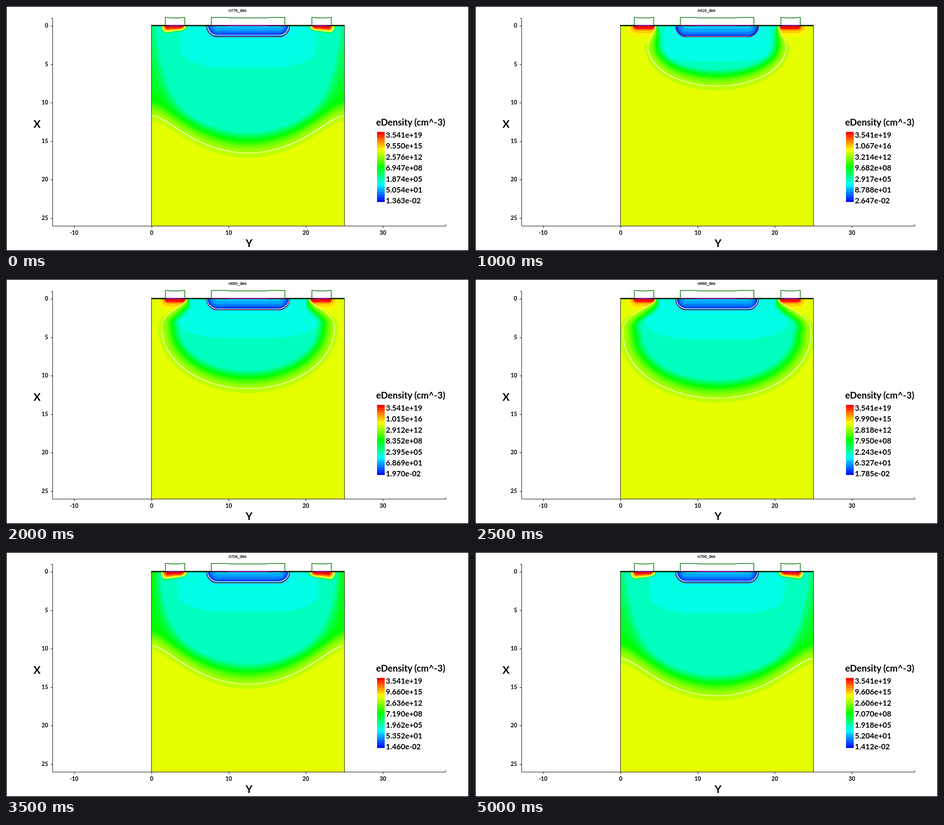
These frames come from a looping animation (1027 by 545 pixels, 5.5 s). An HTML page with a canvas:

```html
<!DOCTYPE html>
<html lang="en">
<head>
<meta charset="utf-8">
<title>eDensity</title>
<style>
  html, body { margin: 0; width: 100%; height: 100%; overflow: hidden; background: #fff; }
  canvas { position: absolute; left: 323px; top: 44px; }
  svg { position: absolute; left: 0; top: 0; }
  text { font-family: Lato, "Open Sans", sans-serif; font-weight: 700; }
  #title { font: 9px "Liberation Sans", Arial, sans-serif; stroke: #000; stroke-width: 0.25px; }
</style>
</head>
<body>
<canvas id="map" width="428" height="446"></canvas>
<svg id="plot" width="1027" height="545" viewBox="0 0 1027 545"></svg>
<script>
const W = 428, H = 446, STEP = 500, PEAK = 3.541e19, BANDS = 27;
const HALF = W / 2;

// lo: lowest density; line: depth of the white line inside the well;
// inner: half width and depth of the aqua zone around the gate
const states = [
  { id: 776, lo: 1.363e-2, kind: 'wide', edge: 200, mid: 283, hot: 0, size: 1, inner: [150, 93], line: 3.5 },
  { id: 1154, lo: 14.222, kind: 'pool' },
  { id: 416, lo: 2.6474e-2, kind: 'plume', reach: 153, at: 46, mid: 134, inner: [118, 80], line: 0.7 },
  { id: 632, lo: 2.25e-2, kind: 'plume', reach: 175, at: 57, mid: 173, inner: [140, 85], line: 1.6 },
  { id: 650, lo: 1.9698e-2, kind: 'plume', reach: 191, at: 64, mid: 200, inner: [155, 87], line: 2.4 },
  { id: 668, lo: 1.785e-2, kind: 'plume', reach: 208, at: 78, mid: 221, inner: [159, 90], line: 2.8 },
  { id: 686, lo: 1.7112e-2, kind: 'wide', edge: 154, mid: 240, hot: 0, top: true, inner: [161, 92], line: 3 },
  { id: 704, lo: 1.46e-2, kind: 'wide', edge: 165, mid: 250, hot: 5, size: 1.1, inner: [155, 89], line: 3.2 },
  { id: 722, lo: 1.297e-2, kind: 'wide', edge: 176, mid: 260, hot: 3.5, size: 1.05, inner: [150, 85], line: 3.5 },
  { id: 740, lo: 1.36e-2, kind: 'wide', edge: 185, mid: 268, hot: 1.5, size: 1.02, inner: [150, 89], line: 3.5 },
  { id: 758, lo: 1.4117e-2, kind: 'wide', edge: 193, mid: 276, hot: 0.5, size: 1, inner: [150, 93], line: 3.5 }
];

// Pairs of distance and level; levels run from 0 (blue) to 32 (red)
const SOFT = [0, 32, 6, 31, 8, 28, 11, 26, 15, 25, 20, 24, 32, 22.9, 45, 22];
const STEEP = [0, 32, 5, 30.5, 8, 27, 10, 24.5, 12, 22, 13.5, 17, 15, 13, 17, 0];
const WELL = [0, 1.5, 2, 1.8, 5, 3.2, 9, 4.4, 14, 5.4, 20, 6.2];
const POOL = [0, 1.5, 0.24, 1.7, 0.38, 7, 0.5, 10.5, 0.62, 13, 0.8, 16.5, 1, 18.5, 1.15, 20.5, 1.34, 21.3, 1.35, 22];
const RIM = [139, 1, 145, 8, 157, 13, 185, 17, 214, 14];

const clamp = (v, a = 0, b = 1) => Math.min(b, Math.max(a, v));
const lerp = (a, b, k) => a + (b - a) * k;
const smooth = z => z * z * (3 - 2 * z);

function ramp(x, p) {
  if (x <= p[0]) return p[1];
  for (let i = 2; i < p.length; i += 2)
    if (x < p[i]) return lerp(p[i - 1], p[i + 1], (x - p[i - 2]) / (p[i] - p[i - 2]));
  return p[p.length - 1];
}

function color(i) {
  const t = 0.0125 + 0.0375 * i;
  return [4 * t - 2, Math.min(4 * t, 4 - 4 * t), 2 - 4 * t].map(c => Math.round(255 * clamp(c)));
}

// Level at distance m inside the depletion edge: parabolic, then a linear tail
function band(m, a, t) {
  if (m > a) return 16 - 5 * (m - a) / t;
  return 22.7 - 6.7 * Math.max(0, (m / a + 0.64) / 1.64) ** 2;
}

function plume(s, u, d) {
  const side = s.reach / 200, depth = s.mid - s.at;
  let m, f;
  if (d > s.at) {
    const y = d - s.at, e = Math.hypot(u / s.reach, y / depth);
    m = (1 - e) * e / Math.hypot(u / s.reach ** 2, y / depth ** 2);
    f = lerp(side, 1, clamp(y / depth));
  } else {
    const round = 1 + (s.reach - 153) / 90;
    const wall = y => lerp(137, s.reach, smooth(1 - (1 - clamp(y / s.at)) ** round));
    m = (wall(d) - u) / Math.hypot(1, wall(d + 0.5) - wall(d - 0.5));
    f = lerp(0.12, side, d / s.at);
  }
  return [m, band(m, 25 * f, 15 * f)];
}

function wide(s, u, d) {
  const k = u / HALF;
  let m = s.mid - (s.mid - s.edge) * (1.23 * k * k - 0.23 * k ** 10.7) - d;
  let level = band(m, 28 + 6 * k ** 4, 17 * (1 + 12 * k ** 9.7));
  level = Math.min(22.7, level + s.hot * k ** 14 * Math.exp(-d / 70));
  if (s.top && u > 139) {
    const rim = d - ramp(u, RIM), a = 1 + 0.4 * (u - 139);
    level = Math.max(level, band(rim, a, a * (0.6 + 6 * k ** 30)));
    m = Math.min(m, rim);
  }
  return [m, level];
}

// Distance from a contact; isolated contacts lie deeper on their outer side
function contactDistance(s, u, d) {
  if (!s.size) return Math.hypot(Math.max(Math.abs(u - 162) - 16, 0), d);
  const x = u - 164;
  return Math.hypot(Math.max(Math.abs(x) - 14, 0), d * (1.1 - 0.012 * clamp(x, -26, 26))) / s.size;
}

// Returns the colour level and a code that changes across white lines
function field(s, u, d) {
  const core = Math.max(u - 68, 0), q = 24.5 - Math.hypot(core, d);
  const near = contactDistance(s, u, d);
  let m, level;
  if (s.kind === 'pool') {
    const e = Math.hypot(core / 54, d / 64);
    m = (1 - e) * 60;
    level = ramp(e, POOL);
  } else {
    [m, level] = (s.kind === 'wide' ? wide : plume)(s, u, d);
    const [rx, ry] = s.inner, y = d - 40;
    const oval = (u / rx) ** 3 + Math.abs(y / (y > 0 ? ry - 40 : 110)) ** 3;
    level = Math.max(level, q > -6 ? 8.2 : oval < 1 ? 9 : 10.2);
    if (q > 0) level = q < s.line ? lerp(8.2, 4, q / s.line) : ramp(q - s.line, WELL);
  }
  level = Math.max(level, s.size ? ramp(near, STEEP) : ramp(near, SOFT) - 4 * Math.max(m, 0));
  const code = (m > 0) + 2 * (q > s.line) + 4 * (s.size > 0 && near < 12.5);
  return [clamp(Math.floor(level * BANDS / 32), 0, BANDS - 1), code];
}

const palette = Array.from({ length: BANDS }, (_, i) => color(i));

function paint(s) {
  const img = new ImageData(W, H), codes = new Uint8Array(HALF * H);
  const put = (x, y, c) => img.data.set([...c, 255], (y * W + x) * 4);
  for (let y = H - 1; y >= 0; y--)
    for (let x = HALF - 1; x >= 0; x--) {
      const n = y * HALF + x, [level, code] = field(s, HALF - 0.5 - x, y);
      codes[n] = code;
      const cut = (x < HALF - 1 && codes[n + 1] !== code) || (y < H - 1 && codes[n + HALF] !== code);
      const c = cut ? [255, 255, 255] : palette[level];
      put(x, y, c);
      put(W - 1 - x, y, c);
    }
  return img;
}

const svg = document.getElementById('plot');
function add(tag, attrs, text = '') {
  const el = document.createElementNS(svg.namespaceURI, tag);
  for (const k in attrs) el.setAttribute(k, attrs[k]);
  el.textContent = text;
  return svg.appendChild(el);
}
const line = (d, stroke = '#000', width = 1) =>
  add('path', { d, stroke, 'stroke-width': width, fill: 'none' });
const label = (x, y, size, text, anchor = 'middle') =>
  add('text', { x, y, 'font-size': size, 'text-anchor': anchor }, text);

line('M0.75 0.75H1026.25V544.25H0.75Z', '#000', 1.5);
line('M100 27.5H103.5V489.5H975.5V486');
for (let v = 0; v <= 25; v += 5) {
  const y = Math.round(44 + 17.12 * v);
  line(`M99 ${y + 0.5}H104`);
  label(93.5, y + 4.3, 12.5, v, 'end');
}
for (let v = -10; v <= 30; v += 10) {
  const x = Math.round(322.5 + 17.12 * v);
  line(`M${x + 0.5} 489V494`);
  label(x, 509.3, 12.5, v);
}
label(69, 270.5, 23.5, 'X');
label(539, 535.5, 23.5, 'Y');

// Device outline, junction and contacts
line('M322.8 43V490M750.8 43V490');
line('M445 44A24.5 24.5 0 0 0 469.5 68.5H604.5A24.5 24.5 0 0 0 629 44', '#800000', 1.6);
line('M322 43.5H751', '#002800', 3);
function contact(x0, x1, end) {
  const a = x0 + end, b = x1 - end;
  line(`M${x0 + 0.5} 42V25.5H${a - 3}L${a + 3} 26.5H${b - 3}L${b + 3} 25.5H${x1 - 0.5}V42`, '#007000', 1.5);
  line(`M${x0} 42.5H${a}M${b} 42.5H${x1}`, '#f0f');
  line(`M${a} 43.5H${b}`, '#f0f', 1.5);
}
contact(353, 397, 9);
contact(678, 722, 9);
contact(455, 619, 38);

// Legend
label(821, 266, 20.3, 'eDensity (cm^-3)', 'start');
palette.forEach((c, i) => add('rect', {
  x: 823, y: 280 + (BANDS - 1 - i) * 5.79, width: 17, height: 5.9, fill: `rgb(${c})`, 'shape-rendering': 'crispEdges'
}));
const marks = Array.from({ length: 7 }, (_, k) => label(842.5, 293 + 24.4 * k, 16.8, '', 'start'));
const title = add('text', { id: 'title', x: 513.5, y: 13, 'text-anchor': 'middle' });

const sci = v => v.toExponential(3).replace(/([+-])(\d)$/, (_, sign, n) => sign + '0' + n);
const ctx = document.getElementById('map').getContext('2d');
const maps = states.map(paint);
let shown = -1;

function show(i) {
  if (i === shown) return;
  shown = i;
  const s = states[i];
  ctx.putImageData(maps[i], 0, 0);
  title.textContent = `n${s.id}_des`;
  marks.forEach((el, k) => { el.textContent = sci(PEAK * (s.lo / PEAK) ** (k / 6)); });
}

const start = performance.now();
function tick() {
  show(Math.floor((performance.now() - start) / STEP) % states.length);
  requestAnimationFrame(tick);
}
tick();
</script>
</body>
</html>
```
